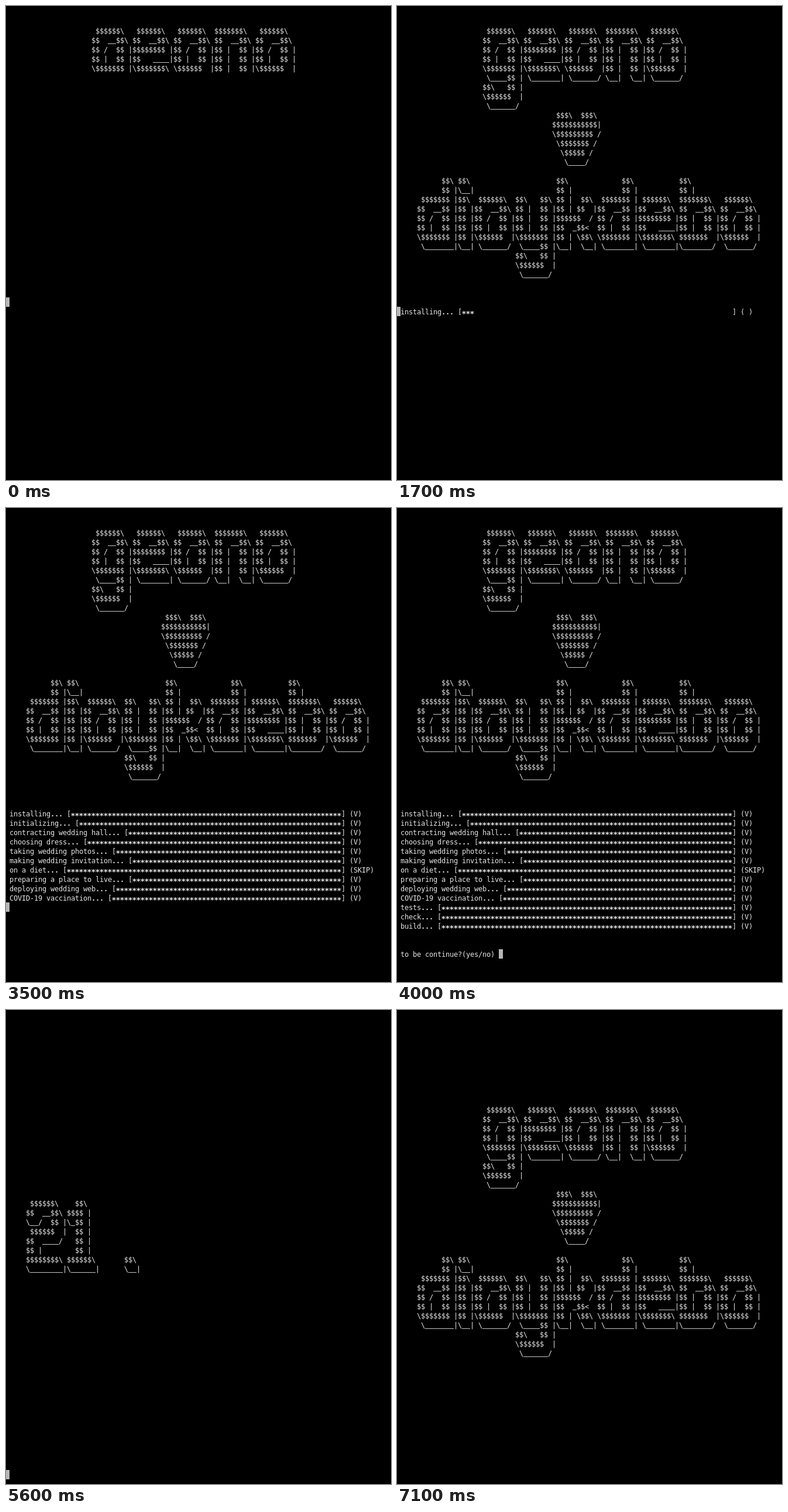
Animation, 658 px wide and 810 px high, one loop 7200 ms. Source, as an HTML page with a canvas:

```html
<!DOCTYPE html>
<html lang="en">
<head>
<meta charset="utf-8">
<title>Terminal</title>
<style>
  html, body { margin: 0; width: 100%; height: 100%; overflow: hidden; background: #000; }
  canvas { display: block; }
</style>
</head>
<body>
<canvas id="screen" width="658" height="810"></canvas>
<script>
const LOOP = 7200, TICK = 100;
const CELL_W = 7, CELL_H = 16, LEFT = 6, TOP = 34, BASE = 13;
const INK = '#e6e6e6', RULE = '#c7c7c7', CURSOR = '#b6b6b6';
const FACE = '"DejaVu Sans Mono", monospace';
const PLAIN = '12px ' + FACE, HEAVY = 'bold 12px ' + FACE, STAR = 'bold 13px ' + FACE;
const BAR_END = 81, BAR_ROW = 30;

const ctx = document.getElementById('screen').getContext('2d');

// Glyph sheets: every letter takes ten columns.
const letters = sheet('bdegiknoy', String.raw`
$$\             $$\                     $$\       $$\
$$ |            $$ |                    \__|      $$ |
$$$$$$$\   $$$$$$$ | $$$$$$\   $$$$$$\  $$\       $$ |  $$\ $$$$$$$\   $$$$$$\  $$\   $$\
$$  __$$\ $$  __$$ |$$  __$$\ $$  __$$\ $$ |      $$ | $$  |$$  __$$\ $$  __$$\ $$ |  $$ |
$$ |  $$ |$$ /  $$ |$$$$$$$$ |$$ /  $$ |$$ |      $$$$$$  / $$ |  $$ |$$ /  $$ |$$ |  $$ |
$$ |  $$ |$$ |  $$ |$$   ____|$$ |  $$ |$$ |      $$  _$$<  $$ |  $$ |$$ |  $$ |$$ |  $$ |
$$$$$$$  |\$$$$$$$ |\$$$$$$$\ \$$$$$$$ |$$ |      $$ | \$$\ $$ |  $$ |\$$$$$$  |\$$$$$$$ |
\_______/  \_______| \_______| \____$$ |\__|      \__|  \__|\__|  \__| \______/  \____$$ |
                              $$\   $$ |                                        $$\   $$ |
                              \$$$$$$  |                                        \$$$$$$  |
                               \______/                                          \______/
`);

const digits = sheet('012.', String.raw`
 $$$$$$\    $$\      $$$$$$\
$$$ __$$\ $$$$ |    $$  __$$\
$$$$\ $$ |\_$$ |    \__/  $$ |
$$\$$\$$ |  $$ |     $$$$$$  |
$$ \$$$$ |  $$ |    $$  ____/
$$ |\$$$ |  $$ |    $$ |
\$$$$$$  /$$$$$$\   $$$$$$$$\ $$\
 \______/ \______|  \________|\__|
`);

const heart = rows(String.raw`
 $$$\  $$$\
$$$$$$$$$$$|
\$$$$$$$$$ /
 \$$$$$$$ /
  \$$$$$ /
   \____/
`);

const banner = [
  ...word(letters, 'geono').slice(2).map(s => indent(20, s)),
  ...heart.map(s => indent(37, s)),
  '',
  ...word(letters, 'dioykdebo').map(s => indent(4, s))
];

const dateParts = [
  { at: 5600, col: 4, text: '21' },
  { at: 5600, col: 28, text: '.' },
  { at: 5900, col: 38, text: '11.' },
  { at: 6300, col: 64, text: '20' }
];

const tasks = [
  ['installing', 1700], ['initializing', 2020], ['contracting wedding hall', 2360],
  ['choosing dress', 2700], ['taking wedding photos', 2890], ['making wedding invitation', 3010],
  ['on a diet', 3110, 'SKIP'], ['preparing a place to live', 3200], ['deploying wedding web', 3310],
  ['COVID-19 vaccination', 3410], ['tests', 3510], ['check', 3720], ['build', 3830]
].map(([name, start, mark = 'V'], i, all) => ({
  name, start, mark,
  end: i === 9 ? 3500 : i === 12 ? 3950 : all[i + 1][1]
}));

function rows(block) {
  return block.split('\n').slice(1, -1);
}

function indent(n, s) {
  return ' '.repeat(n) + s;
}

function sheet(names, block) {
  const widths = { i: 4, 1: 8, '.': 4 };
  const out = {};
  [...names].forEach((name, i) => {
    const w = widths[name] || 10;
    out[name] = rows(block).map(s => s.slice(i * 10, i * 10 + w).padEnd(w));
  });
  return out;
}

function word(set, text) {
  const glyphs = [...text].map(c => set[c]);
  return glyphs[0].map((_, r) => glyphs.map(g => g[r]).join(''));
}

function put(c, x, y) {
  if (c === ' ') return;
  if (c === '_') {
    // Underscores join into one crisp rule.
    ctx.fillStyle = RULE;
    ctx.fillRect(x, y + 1, CELL_W, 1);
    ctx.fillStyle = INK;
    return;
  }
  const star = c === '*';
  ctx.font = star ? STAR : c === '.' ? HEAVY : PLAIN;
  // Stars sit centred on the line.
  ctx.fillText(c, star ? x - 0.4 : x, star ? y + 3 : y);
}

function print(row, col, text) {
  const y = TOP + row * CELL_H + BASE;
  [...text].forEach((c, i) => put(c, LEFT + (col + i) * CELL_W, y));
}

function cursor(row, col = -1) {
  ctx.fillStyle = CURSOR;
  ctx.fillRect(LEFT + col * CELL_W, TOP + row * CELL_H, CELL_W, CELL_H);
  ctx.fillStyle = INK;
}

function drawBanner(top, lastRow) {
  banner.forEach((s, i) => {
    if (top + i <= lastRow) print(top + i, 0, s);
  });
}

function drawTask(task, row, t) {
  const head = task.name + '... [';
  const room = BAR_END - head.length;
  const done = t >= task.end;
  const step = Math.floor((t - task.start) / (task.end - task.start) * 20) + 1;
  const stars = done ? room : Math.floor(room * step / 20);
  const mark = done ? task.mark : ' ';
  print(row, 0, head + '*'.repeat(stars).padEnd(room) + `] (${mark})`);
}

function drawInstall(t) {
  drawBanner(0, 4 + 8 * Math.max(0, Math.floor((t - 100) / 200)));
  tasks.forEach((task, i) => {
    if (t >= task.start) drawTask(task, BAR_ROW + i, t);
  });
  if (t >= 4000) {
    const typed = 'yes'.slice(0, Math.max(0, Math.floor((t - 4800) / 100)));
    const line = 'to be continue?(yes/no) ' + typed;
    print(45, 0, line);
    cursor(45, line.length);
  } else {
    const done = tasks.filter(task => t >= task.end).length;
    cursor(t < 700 ? BAR_ROW - 1 : BAR_ROW + done);
  }
}

function drawDate(t) {
  for (const { at, col, text } of dateParts) {
    if (t >= at) word(digits, text).forEach((s, i) => print(18 + i, col, s));
  }
  cursor(47);
}

function draw(t) {
  ctx.fillStyle = '#000';
  ctx.fillRect(0, 0, 658, 810);
  ctx.fillStyle = INK;
  if (t < 5600) drawInstall(t);
  else if (t < 6800) drawDate(t);
  else drawBanner(8, 12 + 8 * (t - 6800) / TICK);
}

let shown = -1;
function frame() {
  const t = Math.floor(performance.now() % LOOP / TICK) * TICK;
  if (t !== shown) draw(shown = t);
  requestAnimationFrame(frame);
}
frame();
</script>
</body>
</html>
```
